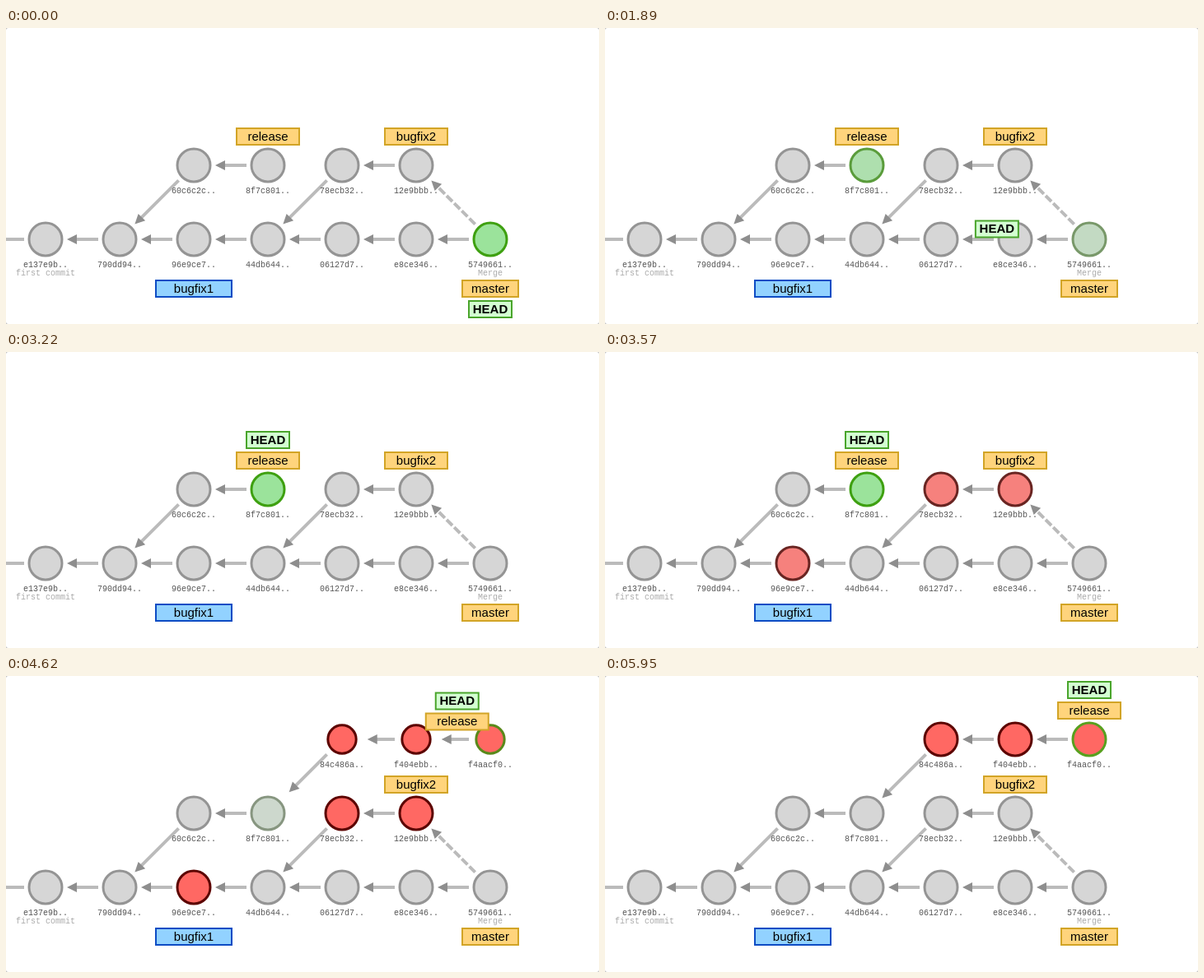
An HTML page with a canvas for the animation above (6.02 s loop, 720 by 360 pixels).

```html
<!DOCTYPE html>
<html lang="en">
<head>
<meta charset="utf-8">
<title>Cherry-picking commits</title>
<style>
  html, body { margin: 0; width: 100%; height: 100%; overflow: hidden; background: #bbb; }
  canvas { display: block; width: 720px; height: 360px; background: #fff; border-radius: 3px; }
</style>
</head>
<body>
<canvas id="stage" width="720" height="360"></canvas>
<script>
const ctx = document.getElementById('stage').getContext('2d');

const LOOP = 6020, STEP = 70;
const CHECKOUT = 1655, FLASH = 3287, PICK = 4287, UNFLASH = 4787;
const MOVE_TIME = 500, FADE_TIME = 600;
const RADIUS = 20;

const GREY = { fill: [214, 214, 214], stroke: [148, 148, 148] };
const GREEN = { fill: [155, 227, 155], stroke: [62, 160, 16] };
const RED = { fill: [255, 104, 99], stroke: [92, 4, 0] };

const BRANCH = ['#ffd47c', '#d2a426'];
const REMOTE = ['#92d2ff', '#0d4cc4'];
const HEAD = ['#d3ffd1', '#4aa52c'];

// id: [x, y, parent, message]
const commits = {
  e137e9b: [48, 257, null, 'first commit'],
  '790dd94': [138, 257, 'e137e9b'],
  '96e9ce7': [228, 257, '790dd94'],
  '44db644': [318, 257, '96e9ce7'],
  '06127d7': [408, 257, '44db644'],
  e8ce346: [498, 257, '06127d7'],
  '5749661': [588, 257, 'e8ce346', 'Merge'],
  '60c6c2c': [228, 167, '790dd94'],
  '8f7c801': [318, 167, '60c6c2c'],
  '78ecb32': [408, 167, '44db644'],
  '12e9bbb': [498, 167, '78ecb32']
};
const picked = {
  '84c486a': [408, 77, '8f7c801'],
  f404ebb: [498, 77, '84c486a'],
  f4aacf0: [588, 77, 'f404ebb']
};
const sources = ['96e9ce7', '78ecb32', '12e9bbb'];

const clamp = v => Math.max(0, Math.min(1, v));
const lerp = (a, b, p) => a + (b - a) * p;
const mix = (a, b, p) => a.map((v, i) => lerp(v, b[i], p));
const blend = (a, b, p) => ({ fill: mix(a.fill, b.fill, p), stroke: mix(a.stroke, b.stroke, p) });
const rgb = c => `rgb(${c.map(Math.round)})`;

function cubicInOut(p) {
  return p < .5 ? 4 * p ** 3 : 1 - 4 * (1 - p) ** 3;
}

// CSS "ease": cubic-bezier(.25, .1, .25, 1)
function cssEase(x) {
  if (x <= 0 || x >= 1) return clamp(x);
  const bezier = (a, b, u) => 3 * a * u * (1 - u) ** 2 + 3 * b * u * u * (1 - u) + u ** 3;
  let low = 0, high = 1;
  for (let i = 0; i < 24; i++) {
    const mid = (low + high) / 2;
    if (bezier(.25, .25, mid) < x) low = mid; else high = mid;
  }
  return bezier(.1, 1, low);
}

const moved = (t, start) => cubicInOut(clamp((t - start) / MOVE_TIME));
const faded = (t, start) => cssEase(clamp((t - start) / FADE_TIME));

function text(str, x, y, font, color) {
  ctx.font = font;
  ctx.fillStyle = color;
  ctx.textAlign = 'center';
  ctx.fillText(str, x, y);
}

function line(x1, y1, x2, y2, dash = []) {
  ctx.strokeStyle = '#bbb';
  ctx.lineWidth = 4;
  ctx.setLineDash(dash);
  ctx.beginPath();
  ctx.moveTo(x1, y1);
  ctx.lineTo(x2, y2);
  ctx.stroke();
  ctx.setLineDash([]);
}

function arrow([fromX, fromY], [toX, toY], grow = 1, dash) {
  const angle = Math.atan2(toY - fromY, toX - fromX);
  const dx = Math.cos(angle), dy = Math.sin(angle);
  const x1 = fromX + dx * RADIUS * 1.3, y1 = fromY + dy * RADIUS * 1.3;
  const x2 = lerp(x1, toX - dx * RADIUS * 1.6, grow);
  const y2 = lerp(y1, toY - dy * RADIUS * 1.6, grow);
  line(x1, y1, x2, y2, dash);
  ctx.save();
  ctx.translate(x2, y2);
  ctx.rotate(angle);
  ctx.fillStyle = '#8e8e8e';
  ctx.beginPath();
  ctx.moveTo(-6, -6);
  ctx.lineTo(6, 0);
  ctx.lineTo(-6, 6);
  ctx.fill();
  ctx.restore();
}

function circle([x, y], radius, style) {
  ctx.beginPath();
  ctx.arc(x, y, radius, 0, Math.PI * 2);
  ctx.fillStyle = rgb(style.fill);
  ctx.fill();
  ctx.strokeStyle = rgb(style.stroke);
  ctx.lineWidth = 3;
  ctx.stroke();
}

function label(id, [x, y, , message]) {
  const font = '10px "Liberation Mono", "Courier New", monospace';
  text(id + '..', x, y + 34, font, '#555');
  if (message) text(message, x, y + 44, font, '#aaa');
}

function tag(name, x, y, width, [fill, stroke], weight = '') {
  ctx.fillStyle = fill;
  ctx.strokeStyle = stroke;
  ctx.lineWidth = 2;
  ctx.beginPath();
  ctx.rect(x - width / 2, y - 10, width, 20);
  ctx.fill();
  ctx.stroke();
  text(name, x, y + 4.5, `${weight} 15px "Liberation Sans", Arial, sans-serif`, '#000');
}

function commitStyle(id, t) {
  if (id === '5749661') return blend(GREEN, GREY, faded(t, CHECKOUT));
  if (id === '8f7c801') return blend(GREY, GREEN, faded(t, CHECKOUT) - faded(t, PICK));
  if (sources.includes(id)) return blend(GREY, RED, faded(t, FLASH) - faded(t, UNFLASH));
  return GREY;
}

function draw(t) {
  const checkout = moved(t, CHECKOUT), pick = moved(t, PICK);
  const showPicked = t > PICK;
  const all = showPicked ? { ...commits, ...picked } : commits;

  ctx.clearRect(0, 0, 720, 360);

  line(0, 257, 22, 257);
  for (const [id, commit] of Object.entries(all)) {
    if (commit[2]) arrow(commit, all[commit[2]], id in picked ? pick : 1);
  }
  arrow(commits['5749661'], commits['12e9bbb'], 1, [10, 3]);

  for (const [id, commit] of Object.entries(commits)) circle(commit, RADIUS, commitStyle(id, t));
  if (showPicked) {
    for (const [id, commit] of Object.entries(picked)) {
      const stroke = id === 'f4aacf0' ? mix(RED.stroke, [88, 160, 30], faded(t, PICK)) : RED.stroke;
      circle(commit, lerp(1, RADIUS, pick), { fill: RED.fill, stroke });
    }
  }
  for (const [id, commit] of Object.entries(all)) label(id, commit);

  tag('bugfix1', 228, 317, 92, REMOTE);
  tag('bugfix2', 498, 132, 76, BRANCH);
  tag('master', 588, 317, 68, BRANCH);
  tag('release', lerp(318, 588, pick), lerp(132, 42, pick), 76, BRANCH);
  const headX = lerp(lerp(588, 318, checkout), 588, pick);
  const headY = lerp(lerp(342, 107, checkout), 17, pick);
  tag('HEAD', headX, headY, 52, HEAD, 'bold');
}

function tick() {
  const t = performance.now() % LOOP;
  draw(Math.floor(t / STEP) * STEP);
  requestAnimationFrame(tick);
}
tick();
</script>
</body>
</html>
```
